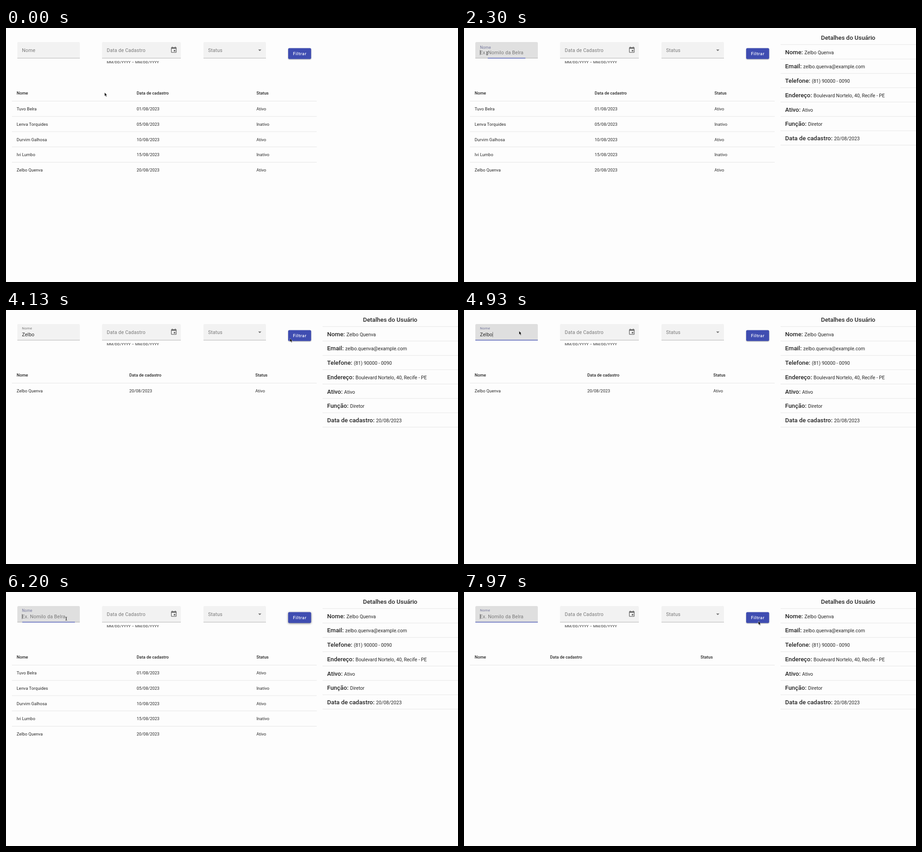
An HTML page that plays this animation: 998 by 561 pixels, repeating every 8000 ms.

```html
<!DOCTYPE html>
<html lang="pt-BR">
<head>
<meta charset="utf-8">
<title>Filtro de usuários</title>
<style>
  html, body { margin: 0; width: 100%; height: 100%; overflow: hidden; background: #fdfdfd; }
  svg { display: block; width: 998px; height: 561px; font-family: Roboto, sans-serif; }
  .field { letter-spacing: .2px; }
  .hint { letter-spacing: .22px; }
  .cell { letter-spacing: .08px; }
  .button { letter-spacing: .8px; }
  text { white-space: pre; }
</style>
</head>
<body>
<svg id="stage" viewBox="0 0 998 561"></svg>
<script>
const LOOP = 8000;
const INK = '#252525', GREY = '#777', RULE = '#e0e0e0', INDIGO = '#3f4db1';
const stage = document.getElementById('stage');
const measure = document.createElement('canvas').getContext('2d');
measure.font = '10.67px Roboto, sans-serif';

const users = [
  ['Tuvo Belra', '01/08/2023', 'Ativo', '(11) 90000 - 0012', 'Rua Tulvem, 230, São Paulo - SP', 'Desenvolvedor'],
  ['Lenva Torquides', '05/08/2023', 'Inativo', '(21) 90000 - 0034', 'Avenida do Vom, 200, Rio de Janeiro - RJ', 'Designer'],
  ['Durvim Galhosa', '10/08/2023', 'Ativo', '(31) 90000 - 0056', 'Rua Quelvo, 70, Belo Horizonte - MG', 'Gerente'],
  ['Ivi Lumbo', '15/08/2023', 'Inativo', '(71) 90000 - 0078', 'Travessa Nulva, 45, Salvador - BA', 'Analista'],
  ['Zelbo Quenva', '20/08/2023', 'Ativo', '(81) 90000 - 0090', 'Boulevard Nortelo, 40, Recife - PE', 'Diretor'],
].map(([name, date, status, phone, address, role]) => ({ name, date, status, phone, address, role }));

// Timeline, all times in ms
const selections = [530, 900, 1230, 1480, 1720];
const focusSpans = [[2230, 3480], [4650, 5650], [6100, 7200], [7480, LOOP]];
const typing = [
  { text: 'Zelbo', type: 2780, erase: 5020 },
  { text: 'Teste', type: 6580, erase: 7600 },
];
const tables = [
  { from: 0, rows: users, columns: [23.5, 288.5, 553] },
  { from: 3920, rows: [users[4]], columns: [23.5, 272.2, 550.5] },
  { from: 5670, rows: users, columns: [23.5, 288.5, 553] },
  { from: 7220, rows: [], columns: [23.5, 190, 522.3] },
];
const keyHints = [[2620, 3850], [6450, 7700]];
const pointerPath = [
  [0, 217.7, 142.5, 'arrow'], [350, 206, 170, 'hand'], [530, 196, 178, 'hand'],
  [900, 181, 211, 'hand'], [1060, 181, 211, 'hand'], [1230, 180, 245, 'hand'],
  [1480, 178, 279, 'hand'], [1660, 177, 312, 'hand'], [1780, 177, 312, 'arrow'],
  [2150, 51, 56, 'beam'], [3260, 51, 56, 'arrow'], [3560, 560, 47, 'hand'],
  [3630, 581, 47, 'hand'], [3840, 646, 57, 'hand'], [4080, 646, 57, 'arrow'],
  [4380, 400, 130, 'arrow'], [4630, 130, 52, 'beam'], [4850, 121.7, 46.5, 'arrow'],
  [5260, 121.7, 46.5, 'arrow'], [5560, 646, 56, 'hand'], [5740, 646, 56, 'arrow'],
  [6040, 133, 59, 'beam'], [6880, 133, 59, 'arrow'], [7130, 646, 57, 'hand'],
  [7250, 646, 57, 'arrow'], [7440, 125, 54, 'beam'], [7700, 125, 54, 'arrow'],
  [7940, 650, 64.5, 'arrow'], [LOOP, 650, 64.5, 'arrow'],
];

const clamp = v => Math.min(1, Math.max(0, v));
const mix = (a, b, k) => a + (b - a) * k;
const smooth = k => k * k * (3 - 2 * k);

// cubic-bezier(.4, 0, .2, 1), solved by bisection
function standardEase(x) {
  x = clamp(x);
  let lo = 0, hi = 1;
  for (let i = 0; i < 14; i++) {
    const s = (lo + hi) / 2, r = 1 - s;
    if (1.2 * r * r * s + .6 * r * s * s + s ** 3 < x) lo = s; else hi = s;
  }
  return 3 * (1 - lo) * lo * lo + lo ** 3;
}

const pulse = (t, [from, to], rise, fall) =>
  t < from ? 0 : t < to ? standardEase((t - from) / rise) : 1 - standardEase((t - to) / fall);

const text = (x, centre, size, content, attrs = '') =>
  `<text x="${x}" y="${centre + size * .355}" font-size="${size}" fill="${INK}" ${attrs}>${content}</text>`;
const rect = (x, y, w, h, fill, attrs = '') =>
  `<rect x="${x}" y="${y}" width="${w}" height="${h}" fill="${fill}" ${attrs}/>`;
const fieldText = (x, centre, content, fill = GREY, size = 10.67, attrs = '') =>
  text(x, centre, size, content, `class="field" style="fill:${fill}" ${attrs}`);

function fieldBox(x, w, shade, line = '#999') {
  return `<path d="M${x} 67V33.700q0-2.700 2.700-2.700h${w - 5.4}q2.700 0 2.700 2.700V67z" fill="rgb(${shade},${shade},${shade})"/>`
    + rect(x, 66.4, w, .7, line);
}

function typedValue(t) {
  for (const { text: word, type, erase } of typing) {
    if (t < type || t > erase + 250) continue;
    const added = Math.floor((t - type) / 90) + 1;
    const removed = t < erase ? 0 : Math.floor((t - erase) / 45) + 1;
    return word.slice(0, Math.max(0, Math.min(added, word.length) - removed));
  }
  return '';
}

function nameField(t) {
  const value = typedValue(t);
  const span = focusSpans.find(([from, to]) => t >= from && t < to);
  const age = span ? t - span[0] : 0;
  const lit = Math.max(...focusSpans.map(s => pulse(t, s, 100, 100)));
  const raised = value ? 1 : Math.max(...focusSpans.map(s => pulse(t, s, 150, 150)));
  let out = fieldBox(25, 138, Math.round(mix(242, 223, lit)));
  out += fieldText(35.3, mix(49, 40.5, raised), 'Nome', span ? '#72759a' : GREY, mix(10.67, 8, raised));
  if (value) out += fieldText(35.3, 54, value, INK);
  else if (span) out += fieldText(35.3, 54, 'Ex. Nomilo da Belra', GREY, 10.67, `opacity="${clamp(age / 70)}"`);
  if (span) {
    const width = 138 * standardEase(age / 180);
    out += rect(94 - width / 2, 65.9, width, 1.3, INDIGO);
    if (age % 1000 < 500) {
      const caretX = 35.4 + measure.measureText(value).width + value.length * .2;
      out += rect(caretX, 48.7, .7, 11, '#333');
    }
  }
  return out;
}

function filters(t) {
  const hovered = t >= 3460 && t < 3680;
  const lifted = t >= 5560 && t < 6260;
  return nameField(t)
    + fieldBox(212, 174, 242)
    + fieldText(222.6, 49, 'Data de Cadastro')
    + text(222.6, 74.7, 8, 'MM/DD/YYYY – MM/DD/YYYY', 'class="hint"')
    + '<path transform="translate(362.500 40.500) scale(.667)" fill="#666" fill-rule="evenodd" d="M19 3h-1V1h-2v2H8V1H6v2H5a2 2 0 0 0-2 2v14a2 2 0 0 0 2 2h14a2 2 0 0 0 2-2V5a2 2 0 0 0-2-2zM19 19H5V8h14zM12 12h5v5h-5z"/>'
    + fieldBox(436, 138, hovered ? 235 : 242, hovered ? '#55555f' : '#999')
    + fieldText(446.3, 49, 'Status')
    + '<path d="M556.800 47.500h7l-3.500 3.500z" fill="#707070"/>'
    + rect(623, 44.5, 50.7, 24, INDIGO,
        `rx="2.7" style="filter:drop-shadow(0 1px ${lifted ? 2 : 1}px rgba(0,0,0,${lifted ? .5 : .35}))"`)
    + text(648.7, 56.7, 9.33, 'Filtrar', 'class="button" font-weight="500" text-anchor="middle" style="fill:#fff"');
}

function table(t) {
  const { rows, columns } = tables.findLast(entry => t >= entry.from);
  let out = rect(13, 161, 673, .8, RULE);
  ['Nome', 'Data de cadastro', 'Status'].forEach((title, i) =>
    out += text(columns[i], 143.3, 9.33, title, 'font-weight="500"'));
  rows.forEach((user, r) => {
    const y = 178.7 + r * 33.75;
    [user.name, user.date, user.status].forEach((value, i) =>
      out += text(columns[i], y, 9.33, value, 'class="cell"'));
    if (r < rows.length - 1) out += rect(13, y + 16.1, 673, .8, RULE);
  });
  return out;
}

function details(t) {
  const index = selections.findLastIndex(time => t >= time);
  if (index < 0) return '';
  const user = users[index];
  const email = user.name.toLowerCase().replace(' ', '.') + '@example.com';
  const lines = [
    ['Nome', user.name], ['Email', email], ['Telefone', user.phone], ['Endereço', user.address],
    ['Ativo', user.status], ['Função', user.role], ['Data de cadastro', user.date],
  ];
  let out = text(848.2, 21, 13.33, 'Detalhes do Usuário', 'font-weight="500" text-anchor="middle"')
    + rect(699, 36.3, 299, .8, RULE);
  lines.forEach(([label, value], i) => {
    const y = 53 + i * 31.7;
    out += text(709, y, 13.33, `<tspan font-weight="500">${label}:</tspan> <tspan font-size="10.67">${value}</tspan>`)
      + rect(699, y + 15.1, 299, .8, RULE);
  });
  return out;
}

function keyHint(t) {
  const opacity = Math.max(...keyHints.map(span => pulse(t, span, 100, 200)));
  if (!opacity) return '';
  return `<g opacity="${opacity}">${rect(459, 380.5, 80, 80.5, '#c8c8cc', 'rx="3.5"')}
    <g fill="none" stroke="#fff" stroke-linecap="round" stroke-linejoin="round">
      <path stroke-width="3.500" d="M482 398.500h35q5.500 0 5.500 5.500v23q0 14.500-14.500 14.500h-17q-14.500 0-14.500-14.500v-23q0-5.500 5.500-5.500z"/>
      <path stroke-width="1.700" d="M482.500 407.500l3.500-3.300 3.500 3.300"/>
      <path stroke-width="1.200" d="M507 435.500q9-.500 9.500-9"/>
    </g>
    <text x="499.300" y="425" font-size="17" text-anchor="middle" style="fill:#fff;font-family:Inter,sans-serif">abc</text></g>`;
}

const pointers = {
  arrow: '<path d="M0 0v7.700l1.700-1.500 1.400 3 1.500-.700-1.400-2.900h2.200z" fill="#000" stroke="#fff" stroke-width=".5"/>',
  hand: '<path d="M-1 1q0-1.200 1-1.200t1 1.200v3l.5-.4q1.100-.2 1.300.7 1.200-.4 1.500.6 1.400-.2 1.400 1.200 0 3-1.700 5H-.5l-3.200-4.300q-.5-1.300.8-1.400L-1 7z" fill="#fff" stroke="#222" stroke-width=".8"/><path d="M1 8v2m1.500-2v2" stroke="#222" stroke-width=".6"/>',
  beam: '<path d="M-1.800-3.700q1.800 0 1.800 1.200v5q0 1.200-1.800 1.200M1.800-3.700Q0-3.700 0-2.500v5q0 1.200 1.800 1.200" fill="none" stroke="#222" stroke-width=".8"/>',
};

function pointer(t) {
  const i = pointerPath.findLastIndex(([time]) => t >= time);
  const [start, x, y, kind] = pointerPath[i];
  const [end, nextX, nextY] = pointerPath[i + 1];
  const k = smooth((t - start) / (end - start));
  return `<g transform="translate(${mix(x, nextX, k)} ${mix(y, nextY, k)})">${pointers[kind]}</g>`;
}

function render() {
  const t = performance.now() % LOOP;
  stage.innerHTML = filters(t) + table(t) + details(t) + keyHint(t) + pointer(t);
  requestAnimationFrame(render);
}
render();
</script>
</body>
</html>
```
